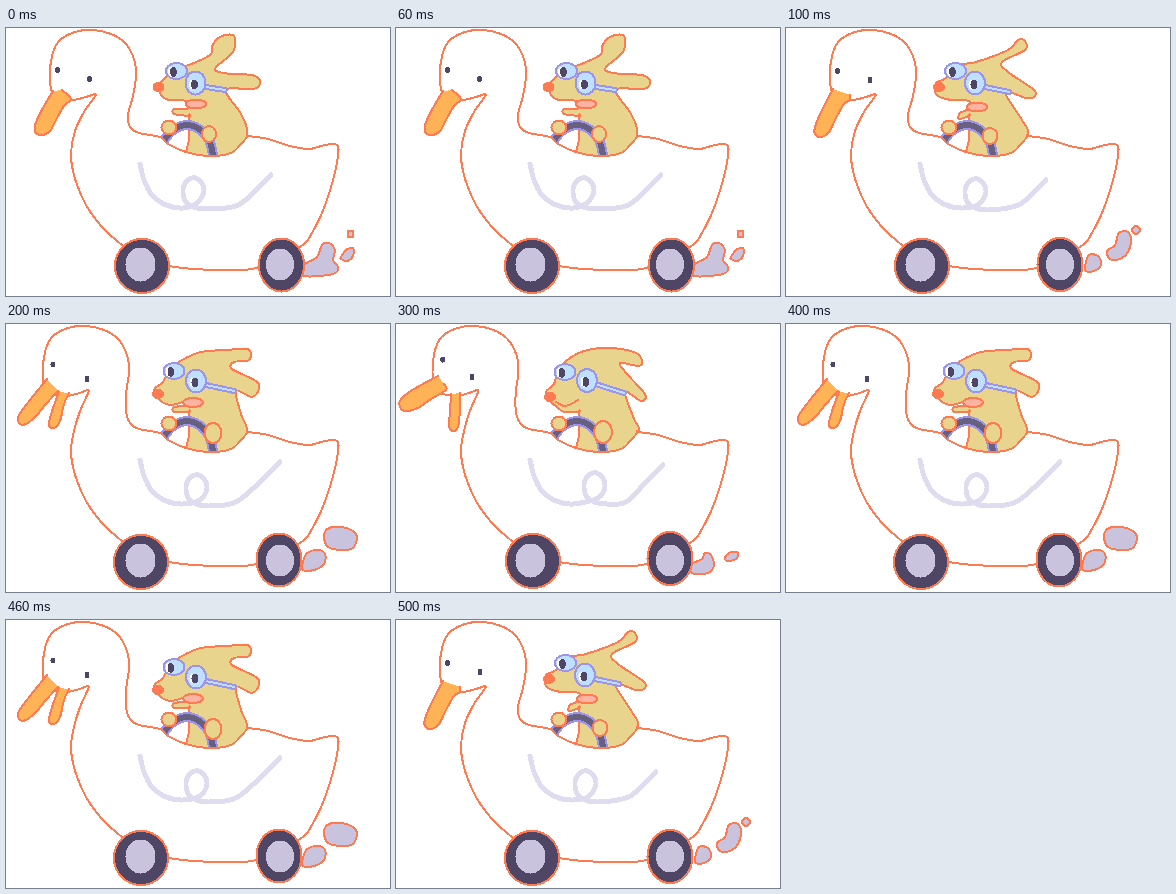
Recreate the animation shown at these times as an HTML page. Size 384 by 268 pixels, loop 600 ms.

```html
<!DOCTYPE html>
<html lang="en">
<head>
<meta charset="utf-8">
<title>Duck car</title>
<style>
html, body { margin: 0; width: 100%; height: 100%; overflow: hidden; background: #fff }
svg { display: block; width: 100%; height: 100%; shape-rendering: crispEdges }
path { stroke-linejoin: round; stroke-linecap: round }
</style>
</head>
<body>
<svg id="stage" viewBox="0 0 384 268"></svg>
<script>
const LINE = '#ff7a50', FUR = '#e8d48c', BEAK = '#ffb356', DARK = '#4e4664', GREY = '#c9c3de',
      SWIRL = '#dfdcf0', GLASS = '#bfdfff', RIM = '#9c94ea', TONGUE = '#ffb3a0', GRIP = '#686080';

const pairs = s => s.split(' ').map(p => p.split(',').map(Number));

// Smooth path through all points; a doubled point makes a corner.
function smooth(pts, closed) {
  const n = pts.length;
  const at = i => pts[closed ? (i + n) % n : Math.max(0, Math.min(n - 1, i))];
  let d = 'M' + pts[0];
  for (let i = 0; i < n - (closed ? 0 : 1); i++) {
    const [a, b, c, e] = [at(i - 1), at(i), at(i + 1), at(i + 2)];
    d += `C${b.map((v, k) => v + (c[k] - a[k]) / 6)} ${c.map((v, k) => v - (e[k] - b[k]) / 6)} ${c}`;
  }
  return d + (closed ? 'Z' : '');
}

const paint = (fill, line, width) => `fill="${fill}" stroke="${line}" stroke-width="${width}"/>`;
const blob = (pts, fill) => `<path d="${smooth(pts, true)}" ${paint(fill, LINE, 2)}`;
const open = (pts, fill) => `<path d="${smooth(pts)}" ${paint(fill, LINE, 2)}`;
const stroke = (pts, color, width) => `<path d="${smooth(pts)}" ${paint('none', color, width)}`;
const tube = (pts, color, width) => stroke(pts, RIM, width + 4) + stroke(pts, color, width);
const oval = (x, y, rx, ry, fill, line = 'none') =>
  `<ellipse cx="${x}" cy="${y}" rx="${rx}" ry="${ry}" ${paint(fill, line, 2)}`;

const neck = pairs('47,66 44,48 46,28 53,13 69,4 87,2 105,6 119,15 128,31 130,48 127,68 122,87 124,99 133,105 154,109');
const hull = pairs('162,116 180,124 203,128 225,125 235,116 242,108 242,108 262,111 284,118 303,121 319,117 331,117 332,128 327,152 318,180 307,203 294,219 250,240 210,242 163,238 130,227');
const chest = pairs('110,212 97,200 83,182 73,162 67,143 65,125 69,103 78,84 88,70 89,66 80,69 64,72');
const loop = pairs('193,176 200,164 196,154 188,151 180,158 180,171 187,179 202,182');
const wheel = pairs('157,114 166,103 180,97 193,101 203,112 207,127');
const torso = ' 230,135 183,135 183,110 183,88 183,88 ';

// The head sways by dx, fading out down the neck.
const body = dx => [...neck, ...hull, ...chest].map(([x, y]) =>
  [x + dx * Math.max(0, Math.min(1, (95 - y) / 28)), y]);

const swirl = ([dx, dy], end) => [
  ...pairs('134,136 138,152 146,167 160,177 177,180'),
  ...loop.map(([x, y]) => [x + dx, y + dy]), [230, 178], [end[0] - 17, end[1] + 17], end];

const lens = ([x, y], rx, ry, px, py) => oval(x, y, rx, ry, GLASS, RIM) +
  oval(x + px - 2, y + py, 3.5, 5, '#fff') + oval(x + px, y + py, 3.5, 5, DARK);

function drawPose(p) {
  const [left, right, end] = pairs(p.goggles);
  const [nose, mouth, hand, grip] = pairs(p.parts);
  const [loopAt, tip] = pairs(p.swirl);
  const [back, front] = pairs(p.tyres);
  return `<g>
    ${blob(pairs(p.head + torso + p.jaw), FUR)}
    ${p.smile ? stroke(pairs(p.smile), LINE, 2) : oval(...mouth, 10, 4.5, TONGUE, LINE)}
    ${oval(...nose, 5, 4, LINE, LINE)}
    ${tube([[right[0] + 10, right[1] + 4], end], GLASS, 2)}
    ${lens(left, 10.5, 8, -3, 1)}
    ${lens(right, 10, 11.5, -1, 1.5)}
    ${tube(wheel, GRIP, 6)}
    ${blob(body(p.sway), '#fff')}
    ${oval(163, 99.5, 7.5, 7, FUR, LINE)}
    ${oval(...hand, ...grip, FUR, LINE)}
    ${stroke(swirl(loopAt, tip), SWIRL, 5)}
    ${p.puffs.map(s => blob(pairs(s), GREY)).join('')}
    ${oval(...back, 27, 27, DARK, LINE) + oval(134.5, 236.5, 15, 17, GREY)}
    ${oval(...front, 22.5, 26.5, DARK, LINE) + oval(274, 236.5, 14, 16, GREY)}
    ${p.beaks.map(s => open(pairs(s), BEAK)).join('')}
    ${pairs(p.eyes).map(e => oval(...e, 2.5, 3, DARK)).join('')}
  </g>`;
}

const cruise = drawPose({
  sway: 0,
  beaks: ['47,63 38,78 30,94 29,104 36,107 44,103 50,92 58,78 65,71 56,62'],
  eyes: '51.5,42 83.5,51',
  head: '153,57 160,49 167,41 180,38 204,27 207,16 216,8 228,8 227,24 209,41 225,46 246,47 254,53 248,61 220,62 235,86 241,106',
  jaw: '168,86 168,81 181,81 180,73 163,72 155,67',
  goggles: '170.5,43 189.5,55 219,62',
  parts: '152.5,59 190,76 203,106 7,8',
  swirl: '-2,-1 265,147',
  tyres: '136,238 275.5,237',
  puffs: ['298,237 311,229 316,217 323,215 329,222 327,232 332,239 327,246 298,248',
          '335,229 340,222 347,220 347,228 341,233 335,231',
          '342,203 342,203 347,203 347,203 347,209 347,209 342,209 342,209']
});

const lean = drawPose({
  sway: 0,
  beaks: ['47,61 36,82 29,99 29,106 35,109 43,104 50,90 58,76 64,72 64,67'],
  eyes: '51.5,43 84,52',
  head: '150,55 160,50 166,40 176,36 190,34 222,22 232,12 239,13 239,22 216,34 222,44 247,61 249,68 240,70 219,64 236,92 242,107',
  jaw: '173,91 174,85 182,81 183,73 165,72 152,68 149,63',
  goggles: '169.5,43 189,55 223,64',
  parts: '153,59 191,79 204,108 7.5,8',
  swirl: '0,0 260,152',
  tyres: '136,238 274,236.5',
  puffs: ['299,238 303,227 312,228 315,237 308,243 300,243',
          '321,223 329,217 333,205 342,204 345,213 342,224 334,231 324,231',
          '346,202 350,197.5 354,202 350,206']
});

const honk = drawPose({
  sway: -7,
  beaks: ['41,55 24,76 13,91 13,99 20,100 30,92 40,80 52,67', '53,68 46,87 43,101 48,104 54,97 58,80 63,69'],
  eyes: '47,40.5 81,55',
  head: '148,66 157,58 163,46 176,36 195,28 220,26 241,25 245,31 241,37 228,38 226,45 250,57 253,65 246,73 230,67 235,90 241,108',
  jaw: '168,88 168,83 180,82 178,78 165,81 155,77',
  goggles: '168,47 190,57 228,67',
  parts: '152,70 187,78.5 207,109 8.5,10',
  swirl: '1,0 274,138',
  tyres: '135,238 273,236',
  puffs: ['297,238 301,229 312,226 319,230 318,240 308,246 297,246',
          '318,212 323,204 336,203 347,207 351,214 347,224 336,226 322,223']
});

const gape = drawPose({
  sway: -7.5,
  beaks: ['42,52 18,65 5,75 4,83 10,87 22,84 35,75 50,66 48,60', '55,70 54,88 53,102 57,107 62,103 64,85 64,69'],
  eyes: '46.5,35.5 76,53',
  head: '150,68 158,60 162,46 170,37 185,28 205,24 225,25 240,29 246,36 243,42 224,39 231,50 249,70 245,77 229,68 238,95 243,108',
  jaw: '168,88 160,82 155,78',
  smile: '160,78 168,82 175,80 182,76',
  goggles: '169,48 191,56.5 228,69',
  parts: '154,73 0,0 207,108 9,11',
  swirl: '9,-2 267,141',
  tyres: '137,237 274,234.5',
  puffs: ['296,240 306,235 309,229 315,231 318,241 312,249 296,249', '329,233 335,228 342,229 340,235 331,237']
});

const stage = document.getElementById('stage');
stage.innerHTML = cruise + lean + honk + gape;

const order = [0, 1, 2, 3, 2, 1];
function show() {
  const now = order[Math.floor(performance.now() / 100) % order.length];
  [...stage.children].forEach((g, i) => g.style.display = i === now ? '' : 'none');
  requestAnimationFrame(show);
}
show();
</script>
</body>
</html>
```
